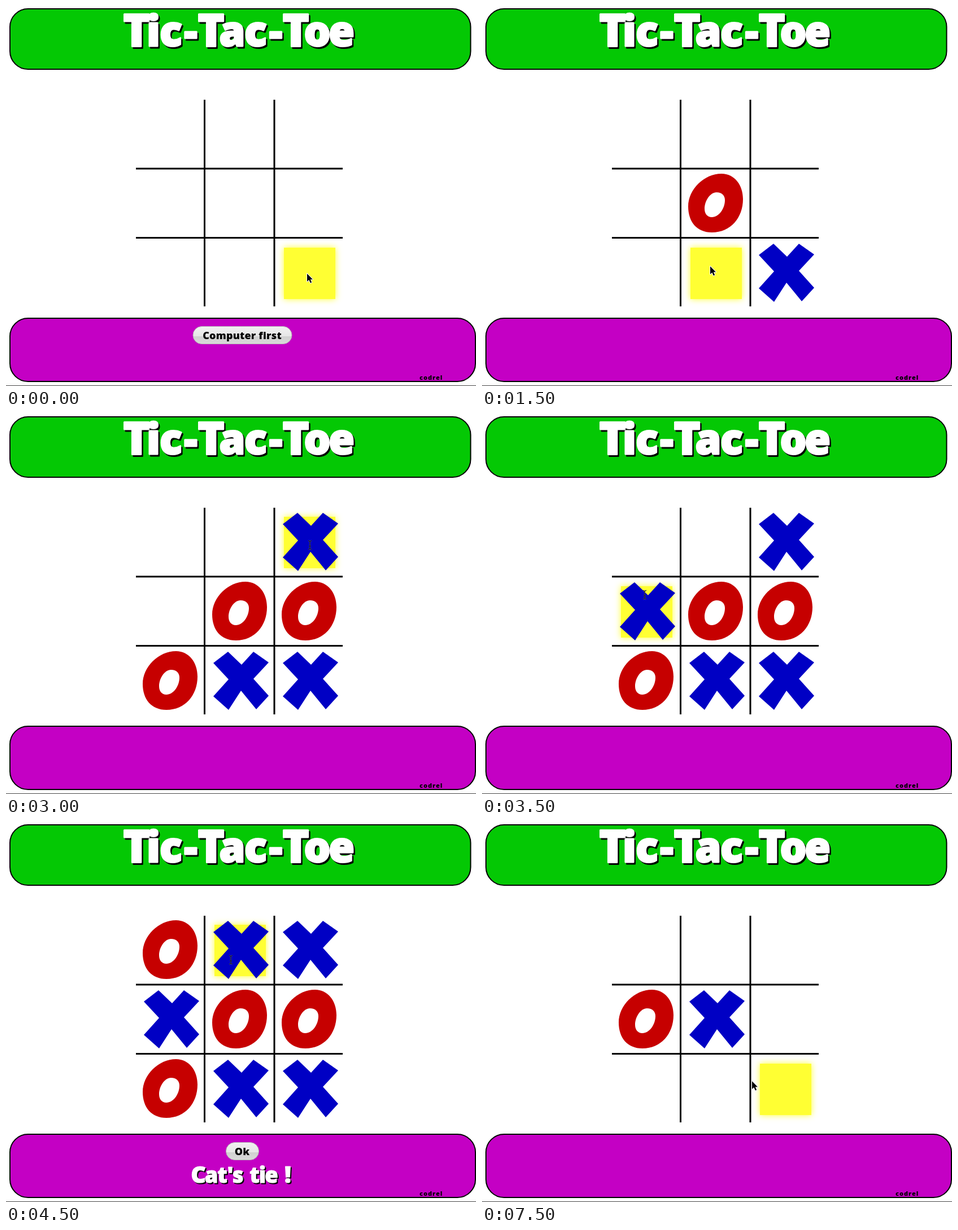
Recreate the animation shown at these times as an HTML page with a canvas. Size 832x673 px, loop 8 s.

```html
<!DOCTYPE html>
<html lang="en">
<head>
<meta charset="utf-8">
<title>Tic-Tac-Toe</title>
<style>
html, body { margin: 0; width: 100%; height: 100%; overflow: hidden; background: #fff; }
canvas { display: block; }
</style>
</head>
<body>
<canvas id="stage" width="832" height="673"></canvas>
<script>
const ctx = document.getElementById('stage').getContext('2d');
const LOOP = 8000;
const FAMILY = '"Open Sans", "Noto Sans", sans-serif';

const CROSS = new Path2D('M0 21L26 1L50 24L71 1L98 20L71 49L98 79L76 103L49 70L27 104L0 80L27 50Z');
const RING = new Path2D(
  'M59 0C82 0 97 20 97 45C97 78 75 104 42 104C15 104 0 85 0 58C0 28 28 0 59 0Z' +
  'M50 33C60 33 65 39 65 47C65 62 54 77 42 77C33 77 29 70 29 62C29 48 39 33 50 33Z');
const ARROW = new Path2D('M0 0V14L3.3 11L5.8 16.5L8.2 15.4L5.8 10.2H10Z');
const BEAM = new Path2D('M-3 -7.5Q0 -7.5 0 -5.5Q0 -7.5 3 -7.5M0 -5.5V5.5M-3 7.5Q0 7.5 0 5.5Q0 7.5 3 7.5M-2 2H2');

// Each step holds until the next: board cells row by row, hovered cell, pointer, button.
const steps = [
  { at: 0,    board: '.........', hover: 8, arrow: [533, 474], button: 'Computer first' },
  { at: 500,  board: '........X', hover: 8, beam: [534, 475] },
  { at: 1000, board: '....O...X', hover: 8, beam: [534, 475] },
  { at: 1500, board: '....O...X', hover: 7, arrow: [404, 461] },
  { at: 2000, board: '....O.OXX', hover: 7, beam: [404, 461] },
  { at: 2500, board: '..X.O.OXX', hover: 2, beam: [538, 232] },
  { at: 3000, board: '..X.OOOXX', hover: 2, beam: [538, 232] },
  { at: 3500, board: '..XXOOOXX', hover: 3, beam: [288, 320] },
  { at: 4000, board: 'O.XXOOOXX', hover: 3, beam: [288, 320] },
  { at: 4500, board: 'OXXXOOOXX', hover: 1, beam: [398, 244], button: 'Ok', tie: true },
  { at: 6500, board: '.........', arrow: [377, 576] },
  { at: 7000, board: '...OX....', arrow: [377, 576] },
  { at: 7500, board: '...OX....', hover: 8, arrow: [478, 459] }
];

const setFont = size => { ctx.font = `800 ${size}px ${FAMILY}`; };

function panel(x, y, w, h, r, fill, line, width) {
  ctx.beginPath();
  ctx.roundRect(x, y, w, h, r);
  ctx.fillStyle = fill;
  ctx.fill();
  ctx.strokeStyle = line;
  ctx.lineWidth = width;
  ctx.stroke();
}

function label(text, x, y, size, spacing, align) {
  setFont(size);
  ctx.letterSpacing = spacing + 'px';
  ctx.textAlign = align;
  ctx.fillStyle = '#000';
  ctx.fillText(text, x, y);
  ctx.letterSpacing = '0px';
}

// White lettering with a hard black shadow; each letter sits on its own centre.
function headline(text, centres, y, size, weight, drop) {
  ctx.textAlign = 'center';
  ctx.lineJoin = 'round';
  ctx.lineWidth = weight;
  for (const [color, shift] of [['#000', drop], ['#fff', 0]]) {
    ctx.fillStyle = ctx.strokeStyle = color;
    [...text].forEach((ch, i) => {
      setFont(/[A-Z!]/.test(ch) ? size * 1.08 : size);
      ctx.fillText(ch, centres[i] + shift, y + shift);
      ctx.strokeText(ch, centres[i] + shift, y + shift);
    });
  }
}

function place(x, y, draw) {
  ctx.save();
  ctx.translate(x, y);
  draw();
  ctx.restore();
}

function inCell(i, draw) {
  place(242 + 123 * (i % 3), 174 + 123 * Math.floor(i / 3), draw);
}

function glow() {
  ctx.shadowColor = ctx.fillStyle = '#ffff33';
  ctx.shadowBlur = 11;
  ctx.fillRect(4, 8, 91, 91);
}

function mark(kind) {
  if (kind === 'X') {
    ctx.translate(2, 0);
    ctx.fillStyle = '#0000c4';
    ctx.fill(CROSS);
  } else {
    ctx.fillStyle = '#c60000';
    ctx.fill(RING, 'evenodd');
  }
}

function button(text) {
  const w = text === 'Ok' ? 58 : 175;
  const mid = 418.5;
  const shade = ctx.createLinearGradient(0, 567, 0, 599);
  shade.addColorStop(0, '#f2f2f2');
  shade.addColorStop(0.55, '#e6e6e6');
  shade.addColorStop(0.56, '#d0d0d0');
  shade.addColorStop(1, '#dadada');
  panel(mid - w / 2, 567.5, w, 31, 15.5, shade, '#b4b4b4', 1);
  label(text, mid - 0.5, 590, 18, 0.2, 'center');
}

function arrow() {
  ctx.lineJoin = 'round';
  ctx.strokeStyle = '#fff';
  ctx.lineWidth = 2;
  ctx.stroke(ARROW);
  ctx.fillStyle = '#000';
  ctx.fill(ARROW);
}

function beam() {
  ctx.strokeStyle = 'rgba(140,140,140,.45)';
  ctx.lineWidth = 2.2;
  ctx.stroke(BEAM);
  ctx.strokeStyle = '#151515';
  ctx.lineWidth = 1;
  ctx.stroke(BEAM);
}

function grid() {
  ctx.fillStyle = '#000';
  for (const x of [350, 473.5]) ctx.fillRect(x, 166, 3, 366);
  for (const y of [286.5, 409]) ctx.fillRect(230, y, 366, 3);
}

function draw(t) {
  const step = steps.findLast(s => s.at <= t);
  ctx.fillStyle = '#fff';
  ctx.fillRect(0, 0, 832, 673);

  panel(7, 5, 815.5, 107, 32, '#04c804', '#000', 2);
  headline('Tic-Tac-Toe', [231, 261, 292, 327, 363, 400.5, 442, 477.5, 513, 551, 594], 71, 74, 3, 2.5);

  if (step.hover !== undefined) inCell(step.hover, glow);
  grid();
  [...step.board].forEach((kind, i) => {
    if (kind !== '.') inCell(i, () => mark(kind));
  });

  panel(7, 553, 824, 112, 32, '#c400c4', '#000', 2);
  label('codrel', 732, 662, 11, 1, 'left');
  if (step.button) button(step.button);
  if (step.tie) {
    headline("Cat's tie !", [340.5, 363.5, 383, 397, 410.5, 426, 440, 454, 470, 486, 499], 639, 38, 1.2, 2);
  }
  ctx.fillStyle = '#444';
  ctx.fillRect(0, 672, 832, 1);

  if (step.arrow) place(...step.arrow, arrow);
  if (step.beam) place(...step.beam, beam);
}

let start;
function tick(now) {
  start ??= now;
  draw((now - start) % LOOP);
  requestAnimationFrame(tick);
}
draw(0);
requestAnimationFrame(tick);
</script>
</body>
</html>
```
